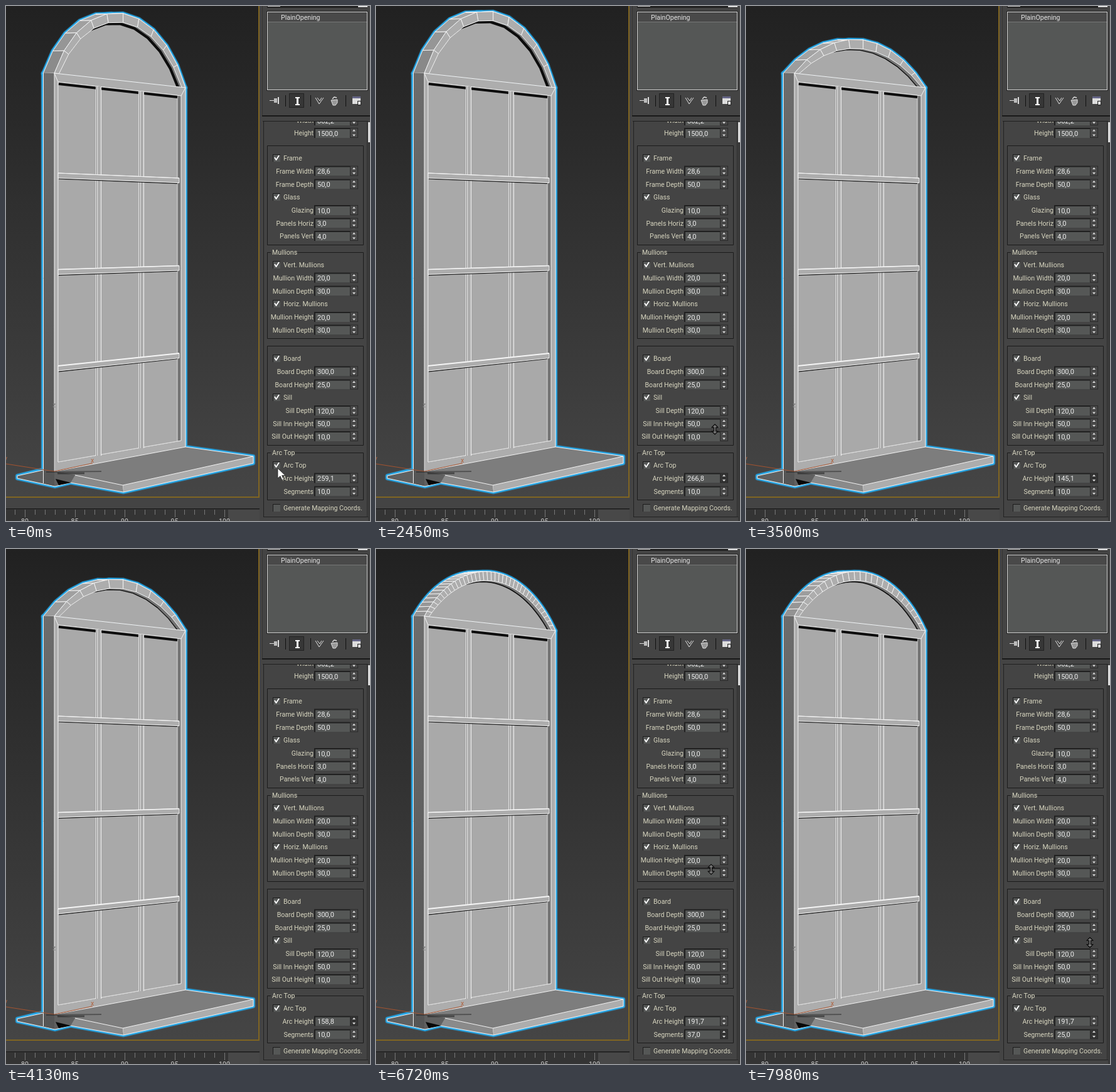
These frames come from a looping animation (580 px wide and 820 px high, 8 s). An HTML page with a canvas:

```html
<!DOCTYPE html>
<html lang="en">
<head>
<meta charset="utf-8">
<title>Arched window parameters</title>
<style>
html, body { margin: 0; width: 580px; height: 820px; overflow: hidden; background: #444; }
canvas { display: block; }
</style>
</head>
<body>
<canvas id="stage" width="580" height="820"></canvas>
<script>
const ctx = document.getElementById('stage').getContext('2d');
const LOOP = 8000, STEP = 70;
const FONT = 'Roboto, "Liberation Sans", sans-serif';
const WHITE = '#f4f4f4', FACE = '#adadad', GLASS = '#a9a9a9', FIELD = '#555756', LABEL = '#d8d6c0';

const ramp = (time, from, to, power = 1) =>
  Math.min(1, Math.max(0, (time - from) / (to - from))) ** power;

// Dragged parameters: each ramp is one stroke of the mouse.
const arcHeight = t => 259.1 + 30.9 * ramp(t, 1521, 2250, 1.6) - 153 * ramp(t, 2250, 3570)
  + 54.7 * ramp(t, 3634, 4550, 1.5);
const segmentCount = t => 10 + 27 * ramp(t, 6160, 6720) - 32 * ramp(t, 6790, 7420) + 20 * ramp(t, 7490, 7980);

function rect(x, y, w, h, color) { ctx.fillStyle = color; ctx.fillRect(x, y, w, h); }

function trace(points, close) {
  ctx.beginPath();
  points.forEach(([x, y]) => ctx.lineTo(x, y));
  if (close) ctx.closePath();
}

function poly(points, fill, stroke, width = 1) {
  trace(points, true);
  if (fill) { ctx.fillStyle = fill; ctx.fill(); }
  if (stroke) { ctx.strokeStyle = stroke; ctx.lineWidth = width; ctx.stroke(); }
}

function line(points, color = WHITE, width = 1) {
  trace(points, false);
  ctx.strokeStyle = color;
  ctx.lineWidth = width;
  ctx.stroke();
}

function text(str, x, y, color = LABEL, align = 'left', size = 10.6) {
  ctx.font = size + 'px ' + FONT;
  ctx.textAlign = align;
  ctx.fillStyle = color;
  ctx.fillText(str, x, y);
}

function gradient(y0, y1, ...colors) {
  const g = ctx.createLinearGradient(0, y0, 0, y1);
  colors.forEach((c, i) => g.addColorStop(i / (colors.length - 1), c));
  return g;
}

// Perspective of the front plane; x is measured from the centre, z upwards from the arc base.
const HALF = 441, FAR = 1.103;
function project(x, z) {
  const u = (x + HALF) / (2 * HALF), w = 1 - u + FAR * u;
  return [(77 * (1 - u) + 286 * FAR * u) / w, (107 * (1 - u) + 130 * FAR * u - 0.42 * z) / w];
}

function arc(half, rise, count) {
  const radius = (half * half + rise * rise) / (2 * rise), limit = 2 * Math.atan(rise / half);
  return Array.from({ length: count + 1 }, (_, i) => {
    const a = limit * (2 * i / count - 1);
    return project(radius * Math.sin(a), radius * (Math.cos(a) - Math.cos(limit)));
  });
}

const shift = (points, dx, dy) => points.map(([x, y]) => [x + dx, y + dy]);

function drawArch(height, count) {
  const rise = 0.926 * height + 28.6;
  const outer = arc(HALF, rise, count), inner = arc(HALF - 28.6, rise - 36, count);
  const back = shift(outer, -18, 0.5);
  const body = [[18, 748], [59, 738], [59, 107], [286, 130], [286, 702], [394, 717], [394, 728],
    [187, 774], [103, 759], [78, 765], [18, 752]];

  ctx.lineJoin = 'round';
  for (const [color, width] of [['rgba(39,169,234,.35)', 7], ['#27a9ea', 5]]) {
    [body, back, outer].forEach(p => poly(p, null, color, width));
  }

  for (let i = 0; i < count; i++) {
    const slope = Math.cos((2 * (i + 0.5) / count - 1) * 2 * Math.atan(rise / HALF));
    const shade = 100 + 70 * slope;
    poly([back[i], back[i + 1], outer[i + 1], outer[i]], `rgb(${shade},${shade},${shade})`, WHITE);
  }

  // Recess seen through the opening, with the glass behind it.
  ctx.save();
  trace(inner, true);
  ctx.clip();
  poly(inner, '#747474');
  const pane = shift(inner, -5, 2);
  poly(pane, GLASS);
  line(pane.slice(Math.floor(count * 0.35)), '#0c0c0c', 1.3 + 3 * ramp(height, 185, 260));
  ctx.restore();

  for (let i = 0; i < count; i++) {
    poly([outer[i], outer[i + 1], inner[i + 1], inner[i]], FACE, WHITE);
  }
}

function drawSills() {
  poly([[18, 748], [59, 739], [80, 741], [112, 748], [103, 759], [78, 765], [18, 752]], '#606060');
  line([[59, 739], [18, 748], [18, 752], [78, 765], [103, 759]]);
  poly([[77, 741], [286, 702], [394, 717], [186, 763], [110, 747]], '#7d7d7d');
  poly([[186, 763], [394, 717], [394, 728], [187, 774]], FACE, WHITE);
  poly([[110, 747], [186, 763], [187, 774], [103, 759]], '#8a8a8a');
  line([[110, 747], [186, 763]]);
  line([[103, 759], [187, 774]]);
  line([[286, 702], [394, 717]]);
  poly([[79, 753], [104, 759], [84, 763]], '#080808');
}

function drawFrame() {
  poly([[59, 107], [77, 107], [77, 764], [59, 760]], gradient(107, 764, '#6c6c6c', '#555'));
  line([[59.5, 107], [59.5, 760]]);
  poly([[77, 107], [286, 130], [286, 702], [77, 741]], FACE, WHITE);
  poly([[83, 121], [279, 143], [279, 692], [83, 726]], '#737373', WHITE);
  poly([[83, 121], [273, 142], [273, 693], [83, 726]], GLASS, '#ddd');
  line([[84, 124], [273, 145]], '#0c0c0c', 4);
  line([[77, 107], [83, 121]]);
  line([[286, 130], [279, 143]]);

  for (const [x, top, bottom] of [[143, 128, 716], [211, 136, 704]]) {
    rect(x, top, 3, bottom - top, '#707070');
    rect(x + 3, top, 5, bottom - top, FACE);
    for (const dx of [0.5, 2.5, 8.5]) line([[x + dx, top], [x + dx, bottom]]);
  }
  for (let row = 0; row < 3; row++) {
    const left = 266 + 153.5 * row, right = 274 + 139.5 * row;
    line([[84, left + 9], [273, right + 8.5]], '#151515', 1.5);
    poly([[83, left], [276, right], [276, right + 7.5], [83, left + 8]], FACE, WHITE);
    line([[83, left], [276, right]], WHITE, 1 + row * 0.4);
  }
}

function drawAxes() {
  line([[76.5, 640], [76.5, 741]], '#858585');
  line([[0, 729], [77, 741], [138, 728]], '#a5532f');
  line([[64, 742], [152, 741]], 'rgba(20,20,20,.4)', 2);
  line([[82, 744], [125, 744]], 'rgba(20,20,20,.5)', 3);
  text('z', 74, 639, '#777');
  text('x', 135, 727, '#b0633f');
  text('y', -3, 724, '#b0633f');
}

function drawTimeline() {
  rect(0, 783, 408, 37, '#444');
  rect(0, 800, 404, 20, '#343434');
  rect(0, 800, 404, 1, '#171717');
  rect(354, 802, 50, 18, '#484848');
  for (let i = -1; i <= 20; i++) rect(Math.round(30 + i * 15.9), 802, 1, i % 5 ? 8 : 12, '#777');
  for (let i = 0; i < 5; i++) text(String(80 + i * 5), 30 + i * 79.5, 824, '#ccc', 'center');
  rect(0, 781, 404, 2, '#806522');
  rect(402, 0, 2, 783, '#806522');
}

function spinner(label, value, y, pressed) {
  text(label, 490, y + 4, LABEL, 'right');
  rect(491, y - 8, 57, 16, '#202020');
  rect(493, y - 6, 55, 14, FIELD);
  text(value, 496, y + 4.5, '#eee', 'left', 11);
  rect(548, y - 8, 13, 16, '#2a2a2a');
  rect(549, y - 7, 11, 14, pressed ? '#333' : '#484848');
  for (const s of [-1, 1]) poly([[552, y + 2.5 * s], [557, y + 2.5 * s], [554.5, y + 5.5 * s]], '#ddd');
}

function checkbox(label, y, on = true) {
  rect(425, y - 6, 12, 12, '#1d1d1d');
  rect(426, y - 5, 11, 11, FIELD);
  if (on) line([[428, y - 1], [430.5, y + 3], [435, y - 4]], '#fff', 1.8);
  text(label, 442, y + 4);
}

// Rows with a value are spinners, the others are checkboxes.
function group(top, bottom, title, rows, pressed) {
  ctx.strokeStyle = '#1b1b1b';
  ctx.lineWidth = 1;
  ctx.strokeRect(416.5, top + 0.5, 153, bottom - top);
  if (title) {
    rect(422, top - 4, title.length * 5 + 2, 10, '#444');
    text(title, 424, top + 4);
  }
  rows.forEach((row, i) => {
    const [label, value] = row.split('='), y = Math.round((top + 20 + i * 20.7) * 2) / 2;
    if (value) spinner(label, value, y, label === pressed);
    else checkbox(label, y);
  });
}

function drawToolbar() {
  for (const x of [445, 485, 541]) rect(x, 142, 1, 18, '#111');
  rect(451, 139, 24, 23, '#222');
  rect(452, 140, 22, 21, '#363636');
  rect(463, 145, 3, 12, '#fff');
  for (const y of [145, 156]) rect(461, y, 7, 2, '#fff');
  rect(420, 150, 7, 1, '#ddd');
  rect(427, 147, 5, 7, '#bbb');
  rect(433, 145, 2, 11, '#ddd');
  line([[493, 146], [499, 156], [506, 146]], '#ddd');
  line([[496, 146], [500, 151], [503, 146]], '#ddd');
  poly([[518, 150], [528, 149], [528, 154], [525, 158], [521, 158]], '#999', '#ddd');
  line([[520, 148], [523, 145], [527, 146]], '#ddd', 1.5);
  rect(552, 144, 13, 12, '#ddd');
  rect(552, 144, 13, 3, '#668');
  rect(560, 151, 6, 7, '#222');
  rect(561, 152, 4, 5, '#ddd');
}

function drawPanel(height, count, pressed) {
  rect(404, 0, 176, 820, '#444');
  rect(408, 0, 1, 175, '#333');
  rect(416, 0, 160, 3, '#222');
  rect(417, 0, 20, 1, '#ccc');
  rect(561, 0, 15, 2, '#ddd');

  rect(415, 8, 162, 127, '#222');
  rect(416, 9, 160, 125, '#d5d5d5');
  rect(417, 10, 158, 123, FIELD);
  rect(417, 10, 158, 15, '#494949');
  rect(417, 25, 158, 1, '#777');
  text('PlainOpening', 438, 22, '#e4e4e4');
  drawToolbar();
  rect(408, 174, 172, 2, '#191919');

  ctx.save();
  ctx.beginPath();
  ctx.rect(408, 184, 172, 636);
  ctx.clip();
  spinner('Width', '882,2', 182);
  ctx.restore();
  rect(409, 183, 168, 1, '#202020');
  rect(410, 184, 1, 630, '#222');
  rect(410, 813, 167, 1, '#222');
  rect(575, 184, 1, 630, '#2b2b2b');
  rect(577, 184, 3, 636, '#373737');
  rect(577, 185, 3, 32, '#ddd');

  spinner('Height', '1500,0', 202);
  group(222, 380, '', ['Frame', 'Frame Width=28,6', 'Frame Depth=50,0', 'Glass', 'Glazing=10,0',
    'Panels Horiz=3,0', 'Panels Vert=4,0']);
  group(392, 529, 'Mullions', ['Vert. Mullions', 'Mullion Width=20,0', 'Mullion Depth=30,0',
    'Horiz. Mullions', 'Mullion Height=20,0', 'Mullion Depth=30,0']);
  group(541, 699, '', ['Board', 'Board Depth=300,0', 'Board Height=25,0', 'Sill', 'Sill Depth=120,0',
    'Sill Inn Height=50,0', 'Sill Out Height=10,0']);
  group(711, 786, 'Arc Top', ['Arc Top', 'Arc Height=' + height.toFixed(1).replace('.', ','),
    `Segments=${count},0`], pressed);
  checkbox('Generate Mapping Coords.', 799, false);
}

function drawArrow(x, y) {
  const shape = [[0, 0], [0, 16], [4, 12.5], [7, 19], [9.5, 18], [6.7, 11.5], [12, 11.5]];
  poly(shift(shape, x, y), '#fff', '#222', 0.8);
}

function drawResize(x, y) {
  const half = [[0, -8], [5, -3], [1.5, -3], [1.5, 3], [5, 3], [0, 8]];
  const mirrored = half.slice(1, 5).reverse().map(([dx, dy]) => [-dx, dy]);
  poly(shift(half.concat(mirrored), x, y), '#777', '#0b0b0b', 1.2);
}

// While dragging, the pointer's height follows the value being changed.
function drawCursor(t, height, segments) {
  if (t < 1540) {
    const p = ramp(t, 600, 1260);
    drawArrow(433 + 119 * p + 4 * ramp(t, 1330, 1400), 736 + 15 * p + 18 * Math.sin(Math.PI * p));
  } else if (t < 4690) {
    drawResize(552 - 12 * ramp(t, 1540, 1890), 752 - (height - 259.1) * 10.1);
  } else if (t >= 6230) {
    drawResize(552 - 18 * ramp(t, 6160, 6720) + 14 * ramp(t, 7490, 7980), 772 - (segments - 10) * 9.7);
  } else if (t >= 5320) {
    const p = ramp(t, 5320, 5950);
    drawArrow(134 + 432 * Math.sin(1.8 * p), 808 - 42 * p - 80 * Math.sin(Math.PI * p));
  }
}

function render(now) {
  const time = Math.floor((now % LOOP) / STEP) * STEP;
  const height = arcHeight(time), segments = segmentCount(time), count = Math.round(segments);
  const pressed = time >= 6230 ? 'Segments' : time >= 1540 && time < 4690 ? 'Arc Height' : '';
  rect(0, 0, 403, 782, gradient(0, 782, '#212121', '#333', '#454545'));
  drawArch(height, count);
  drawSills();
  drawFrame();
  drawAxes();
  drawTimeline();
  drawPanel(height, count, pressed);
  drawCursor(time, height, segments);
}

const start = performance.now();
function tick() {
  render(performance.now() - start);
  requestAnimationFrame(tick);
}
tick();
</script>
</body>
</html>
```
